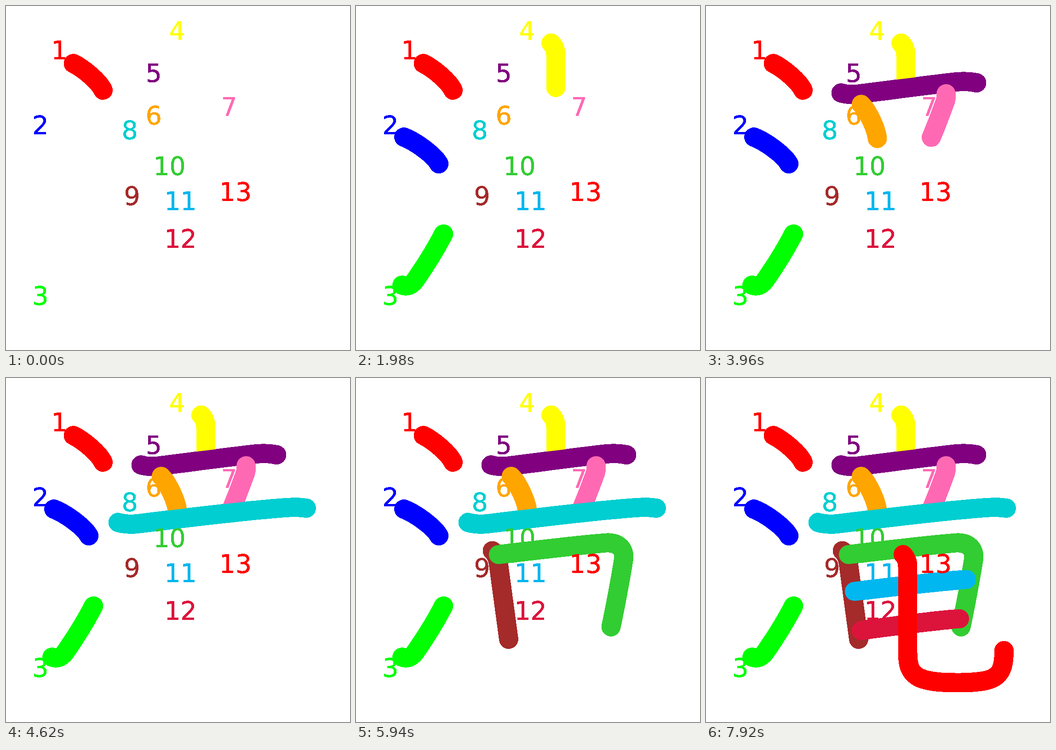
Animation of 748 by 748 pixels, one loop 8580 ms. Source, as an HTML page:

```html
<!DOCTYPE html>
<html lang="en">
<head>
<meta charset="utf-8">
<title>Stroke order</title>
<style>
  html, body { margin: 0; width: 100%; height: 100%; overflow: hidden; background: #fff; }
  svg { display: block; width: 100vw; height: 100vh; }
  path { fill: none; stroke-width: 41.2; stroke-linecap: round; stroke-linejoin: round; }
  text { font: 55px "DejaVu Sans", sans-serif; }
</style>
</head>
<body>
<svg viewBox="0 0 748 748">
  <!-- Turns partly covered edge pixels solid -->
  <filter id="solid" filterUnits="userSpaceOnUse" x="0" y="0" width="748" height="748" color-interpolation-filters="sRGB">
    <feComponentTransfer><feFuncA type="discrete" tableValues="0 1 1 1 1 1 1 1"/></feComponentTransfer>
  </filter>
  <g filter="url(#solid)"><g id="strokes"></g><g id="labels"></g></g>
</svg>
<script>
const STEP = 660;

// colour, label x, label baseline, path
const strokes = [
  ['#f00', 98.4, 114.6, 'M146.5 125C169 136 202 164 211 183'],
  ['#00f', 57.5, 278, 'M104 285C130 295 170 324 180.2 343.2'],
  ['#0f0', 57.5, 649, 'M100 607C112 611 120 608 129 596C150 566 172 531 190.3 495.8'],
  ['#ff0', 354.5, 73, 'M424 80.5C432 88 434.5 96 434.5 107V177'],
  ['#800080', 303.8, 165, 'M293.5 189C306 193 321 193 334 191C392 184 477 172.5 540 165.5C557 163.5 572 163.5 588.5 167'],
  ['#ffa500', 303.8, 257, 'M337.5 213.5C352 228 370 266 372.5 288'],
  ['#ff69b4', 467.8, 238, 'M522 190.5C523 197 522 202 520 208C512 230 500 262 490 285.5'],
  ['#00ced1', 251.8, 289, 'M243.5 314C257 318 272 318.5 286 317C370 306.5 510 289.5 601 282.5C621 281 635 280 653 283'],
  ['#a52a2a', 256.6, 432, 'M296.5 375.5C304 383 308 391 309.5 402L332 568'],
  ['#32cd32', 320.4, 367, 'M309.5 384C390 375 470 364.5 543 358.5C570 356.5 585 372 582 393C577 427 563 502 554.5 541'],
  ['#00b7ef', 344.6, 443, 'M322.5 464C400 455 490 443.5 566.5 438'],
  ['#dc143c', 344.6, 525, 'M337.5 549C405 540 482 528.5 551.5 523.5'],
  ['#f00', 464, 423, 'M428.5 383.5C436 391 438.5 400 438.5 411V597C438.5 648 457 662.5 547 662.5C632 662.5 648 650 648 592.5']
];

function add(parentId, tag, attributes) {
  const node = document.createElementNS('http://www.w3.org/2000/svg', tag);
  for (const key in attributes) node.setAttribute(key, attributes[key]);
  return document.getElementById(parentId).appendChild(node);
}

const paths = strokes.map(([colour, x, y, d], i) => {
  add('labels', 'text', { x, y, fill: colour }).textContent = i + 1;
  return add('strokes', 'path', { d, stroke: colour });
});

function draw() {
  const current = Math.floor(performance.now() / STEP) % paths.length;
  paths.forEach((path, i) => path.style.display = i <= current ? '' : 'none');
  requestAnimationFrame(draw);
}
draw();
</script>
</body>
</html>
```
